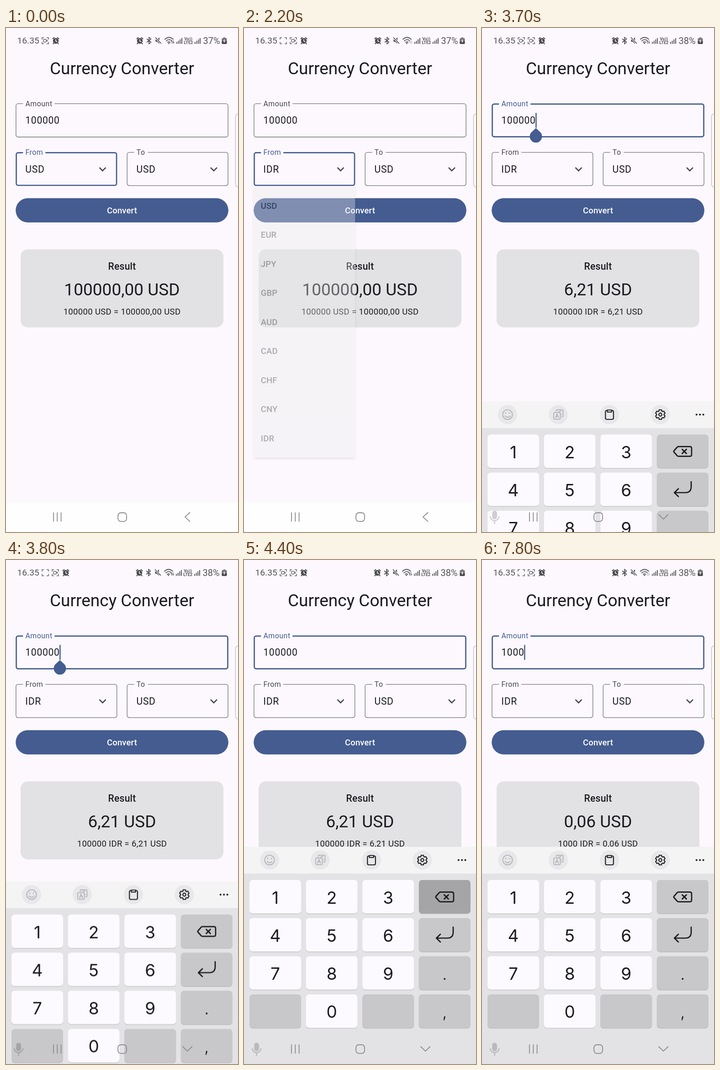
An HTML page that plays this animation: 508 by 1101 pixels, repeating every 8 s.

```html
<!DOCTYPE html>
<html lang="en">
<head>
<meta charset="utf-8">
<title>Currency Converter</title>
<style>
html, body { margin: 0; width: 100%; height: 100%; overflow: hidden; background: #fcf8fd; }
svg { display: block; width: 100%; height: 100%; }
text { font-family: Roboto, sans-serif; fill: #1b1b20; }
.mid { text-anchor: middle; }
.title { font-size: 37.04px; }
.body { font-size: 21.17px; letter-spacing: .66px; }
.label { font-size: 15.88px; letter-spacing: .53px; fill: #45464f; }
.label.on { fill: #445c90; }
.head { font-size: 21.17px; font-weight: 500; letter-spacing: .2px; }
.small { font-size: 18.52px; letter-spacing: .33px; }
.btn { font-size: 18.52px; font-weight: 500; letter-spacing: .13px; }
.digit { font: 37px Inter, sans-serif; text-anchor: middle; }
.line { fill: none; stroke-linecap: round; stroke-linejoin: round; }
.status text { fill: #555558; }
.tiny { font-size: 9.2px; font-weight: 700; text-anchor: middle; }
.blue { fill: #445c90; }

/* 1% = 80 ms; every change is a hard step */
.a { animation: 8s step-end infinite; }
.hid { opacity: 0; }

.scan-new { animation-name: scan-new; }
@keyframes scan-new { 3.75% { opacity: .35 } 5% { opacity: .7 } 6.25% { opacity: 1 } }
.scan-old { animation-name: scan-old; }
@keyframes scan-old {
  3.75% { transform: translateX(9px) } 5% { transform: translateX(18px) } 6.25% { transform: translateX(22px) }
}
.blink { animation: blink 1s step-end infinite; }
@keyframes blink { 0%, 80% { opacity: 0 } 30% { opacity: 1 } }
.arrows { animation-name: arrows; }
@keyframes arrows { 0%, 41.25% { opacity: 1 } 3.75%, 78.75% { opacity: .4 } }
.tray { animation-name: tray; }
@keyframes tray { 31.25% { transform: translateX(-1px) } }
.p37 { animation-name: p37; }
@keyframes p37 { 31.25% { opacity: 0 } }
.p38 { animation-name: p38; }
@keyframes p38 { 31.25% { opacity: 1 } }

.menu { animation-name: menu; transform-origin: 132px 346px; filter: drop-shadow(0 3px 2.5px rgba(0,0,0,.24)); }
@keyframes menu {
  2.5% { opacity: .85; transform: scale(.9) }
  3.75% { opacity: 1; transform: scale(.99) }
  5% { opacity: 1; transform: none }
  27.5% { opacity: .35; transform: none }
  28.75% { opacity: 0 }
}
.usd { animation-name: usd; }
@keyframes usd { 27.5% { opacity: 0 } }
.idr { animation-name: idr; }
@keyframes idr { 27.5% { opacity: 1 } }
.ripple { animation-name: ripple; }
@keyframes ripple { 31.25% { opacity: .12 } 32.5% { opacity: 0 } }

.before { animation-name: before; }
@keyframes before { 45% { opacity: 0 } }
.after { animation-name: after; }
@keyframes after { 45% { opacity: 1 } }

.r1 { animation-name: r1; }
@keyframes r1 { 32.5% { opacity: 0 } }
.r2 { animation-name: r2; }
@keyframes r2 { 32.5% { opacity: 1 } 56.25% { opacity: 0 } }
.n1 { animation-name: n1; }
@keyframes n1 { 56.25% { opacity: 0 } }
.n2 { animation-name: n2; }
@keyframes n2 { 56.25% { opacity: 1 } 85% { opacity: 0 } }
.n3 { animation-name: n3; }
@keyframes n3 { 85% { opacity: 1 } }

.c1 { animation-name: c1; }
@keyframes c1 { 45% { opacity: 1 } 51.25% { opacity: 0 } }
.c2 { animation-name: c2; }
@keyframes c2 { 56.25%, 68.75%, 81.25% { opacity: 1 } 62.5%, 75%, 85% { opacity: 0 } }
.c3 { animation-name: c3; }
@keyframes c3 { 85%, 97.5% { opacity: 1 } 91.25% { opacity: 0 } }
.grip { animation-name: grip; }
@keyframes grip { 45% { opacity: 1 } 55% { opacity: 0 } }

.board { transform: translateY(480px); animation-name: board; }
@keyframes board {
  46.25% { transform: translateY(189px) }
  47.5% { transform: translateY(75.5px) }
  48.75% { transform: translateY(30px) }
  50% { transform: translateY(12px) }
  51.25% { transform: translateY(4px) }
  52.5% { transform: translateY(1px) }
  53.75% { transform: none }
}
.press { animation-name: press; }
@keyframes press { 55% { opacity: 1 } 56.25% { opacity: 0 } }
</style>
</head>
<body>
<svg viewBox="0 0 508 1101">
  <defs>
    <path id="frame" class="line" stroke="#66666a" stroke-width="1.6"
      d="M79 24.5V21h3.5M89.5 21H93v3.5M93 31v3.5h-3.5M82.5 34.5H79V31"/>
    <g id="cam">
      <rect x="82" y="24.7" width="6" height="6" rx="1.2" fill="none" stroke="#66666a" stroke-width="1.4"/>
      <path d="M88 27.7l3-2.6v5.2z" fill="#66666a"/>
    </g>
    <g id="alarm" class="line">
      <circle r="6.3" cy=".6" fill="#4d4d50"/>
      <path d="M-6.6-4l3-2.6M6.6-4l-3-2.6M-4.5 5.6l-1.2 1.4M4.5 5.6l1.2 1.4" stroke="#4d4d50" stroke-width="2"/>
      <path d="M0-2.6V1l2.6 1.6" stroke="#fcf8fd" stroke-width="1.5"/>
    </g>
    <path id="bars" fill="#5c5c60" d="M0 30.5h2v4H0zM3.7 28h2v6.500h-2zM7.400 25h2v9.500h-2zM11 22h2v12.500h-2z"/>
    <path id="chev" fill="#45464f" transform="scale(1.323)" d="M-4.590-3.410L0 1.170l4.590-4.580L6-2 0 4-6-2z"/>
  </defs>

  <rect width="508" height="1101" fill="#fcf8fd"/>
  <rect y="1037" width="508" height="64" fill="#fefefe"/>

  <g class="status">
    <text x="24.5" y="34.300" font-size="19.2">16.35</text>
    <g class="a hid scan-new"><use href="#frame"/><g class="blink"><use href="#cam"/></g></g>
    <g class="a scan-old"><use href="#frame"/><use href="#cam"/><use href="#alarm" x="109" y="27.500"/></g>
    <g class="a tray">
      <use href="#alarm" x="293" y="27.500"/>
      <path class="line" stroke="#505054" stroke-width="1.600" d="M308.500 24l9 7-4.500 3.800V20.200l4.500 3.800-9 7"/>
      <path fill="#505054" d="M327.500 25h3.500l5-4.500v14l-5-4.500h-3.500z"/>
      <path class="line" stroke="#fcf8fd" stroke-width="4" d="M328 21.500l11.500 12"/>
      <path class="line" stroke="#505054" stroke-width="1.700" d="M327.500 21l12 12.500"/>
      <path class="line" stroke="#5c5c60" stroke-width="1.900" d="M348 24.500q9-8 18 0M351 28q6-5 11.500-.5M354 31.300q2.800-2 5.300 0"/>
      <circle cx="356.700" cy="33.500" r="1.500" fill="#5c5c60"/>
      <path class="a arrows line" stroke="#505054" stroke-width="1.200" d="M363.700 33.500v-5.500l-1.300 1.500M366.600 27.500v5.800l1.400-1.500"/>
      <use href="#bars" x="373"/>
      <text class="tiny" x="399.300" y="26.500" font-size="8">Vo))</text>
      <text class="tiny" x="399.300" y="35">LTE2</text>
      <use href="#bars" x="413"/>
    </g>
    <text class="a p37" x="431.500" y="34.500" font-size="20">37%</text>
    <text class="a hid p38" x="430.500" y="34.500" font-size="20">38%</text>
    <path fill="#77777b" d="M476 20.500h4v1.500h1.500q2 0 2 2v9q0 2-2 2h-7q-2 0-2-2v-9q0-2 2-2h1.500z"/>
    <path fill="#4a4a4d" d="M473 28.500h10.500V33q0 2-2 2h-7q-2 0-2-2z"/>
    <path fill="#fcf8fd" d="M479 24l-3.600 5h2.200l-.6 4 3.600-5h-2.200z"/>
  </g>

  <text class="title mid" x="254" y="100.500">Currency Converter</text>

  <g id="fields"></g>
  <text class="body a n1" x="42.300" y="209.200">100000</text>
  <text class="body a hid n2" x="42.300" y="209.200">10000</text>
  <text class="body a hid n3" x="42.300" y="209.200">1000</text>
  <g id="carets" class="blue"></g>
  <path class="a hid grip blue" d="M118 218.500l9.500 9a13.400 13.400 0 1 1-19 0z"/>
  <text class="body a usd" x="42.300" y="315.500">USD</text>
  <text class="body a hid idr" x="42.300" y="315.500">IDR</text>
  <text class="body" x="285.500" y="315.500">USD</text>
  <use href="#chev" x="211.500" y="308.500"/>
  <use href="#chev" x="455" y="308.500"/>

  <rect class="blue" x="21.200" y="371.800" width="465.700" height="53" rx="26.500"/>
  <rect class="a hid ripple" x="21.200" y="371.800" width="465.700" height="53" rx="26.500" fill="#fff"/>
  <text class="btn mid" x="254" y="404.800" style="fill:#fff">Convert</text>

  <rect x="32" y="483.500" width="444" height="170.500" rx="15.900" fill="#e2e1e4"/>
  <text class="head mid" x="254" y="527.500">Result</text>
  <g id="results"></g>

  <rect x="502.600" y="187.600" width="30" height="160" rx="6" fill="#fdfbfe" stroke="#c0bfc4" stroke-width="1.400"/>

  <g class="a hid menu">
    <rect x="21.200" y="346" width="222.200" height="592.800" rx="5.300" fill="#ecebee"/>
    <g id="items"></g>
  </g>

  <g class="a board">
    <rect y="626.500" width="508" height="480" fill="#f4f4f5"/>
    <rect y="685" width="508" height="420" fill="#e3e2e5"/>
    <g fill="#e8e7ea">
      <circle cx="56" cy="655.500" r="21"/><circle cx="167" cy="655.500" r="21"/>
      <circle cx="279" cy="655.500" r="21"/><circle cx="390.500" cy="655.500" r="21"/>
    </g>
    <g class="line" stroke="#b5b4b8" stroke-width="1.900">
      <circle cx="56" cy="655.500" r="10.600"/>
      <path d="M50.500 658.500q5.500 6 11 0"/>
      <path d="M52 652v.5M60 652v.5" stroke-width="2.600"/>
      <rect x="157" y="651" width="14.500" height="14.500" rx="2.500"/>
      <path d="M161 662l3.300-8 3.300 8M162.200 659.500h4.200M162.500 648v-1q0-2 2-2h11q2 0 2 2v11q0 2-2 2h-1"/>
      <path d="M167 648.500h6l-2-1.700M174.500 655h-2" stroke-width="1.500"/>
    </g>
    <g class="line" stroke="#202024" stroke-width="2.200">
      <rect x="270.300" y="646.500" width="17.600" height="19.500" rx="3"/>
      <path d="M274.500 645.500h9.200v4.500h-9.200z" fill="#e8e7ea"/>
      <path id="gear"/>
      <circle cx="390.500" cy="655.500" r="3.300"/>
    </g>
    <g fill="#202024">
      <circle cx="469.800" cy="655.500" r="2.100"/><circle cx="477.200" cy="655.500" r="2.100"/><circle cx="484.600" cy="655.500" r="2.100"/>
    </g>
    <g id="keys"></g>
    <rect class="a hid press" x="383" y="699" width="113" height="73" rx="7" fill="#a5a5a8"/>
    <g class="line" stroke="#1b1b1e" stroke-width="2.700">
      <path d="M430 725.300h25q4 0 4 4v13.400q0 4-4 4h-25q-1.500 0-2.500-1.200l-7-8q-1.400-1.500 0-3l7-8q1-1.200 2.500-1.200z"/>
      <path d="M438.500 731.500l9 9M447.500 731.500l-9 9" stroke-width="3"/>
      <path d="M458 802v11q0 13-13 13h-23.500M430 817.500l-8.800 8.500 8.800 8.500"/>
    </g>
  </g>

  <g class="a hid after" opacity=".2">
    <g opacity=".18">
      <rect x="22.300" y="1054.500" width="10.600" height="18.500" rx="5.300"/>
      <path class="line" stroke="#000" stroke-width="2.400" d="M18 1067.500a9.700 9.700 0 0 0 19.300 0M27.600 1077.500v5"/>
    </g>
  </g>
  <g class="line" stroke="#8b8a8e" stroke-width="1.800">
    <path d="M104 1059v18.500M112.300 1059v18.500M120.600 1059v18.500"/>
    <rect x="245.200" y="1059" width="18.800" height="18.800" rx="6"/>
    <path class="a before" d="M402.500 1058.500l-10.500 9.700 10.500 9.700"/>
    <path class="a hid after" d="M387 1063l10.200 9.800 10.200-9.800"/>
  </g>
</svg>
<script>
const fill = (id, html) => { document.getElementById(id).innerHTML = html; };

// Outlined field with a gap in its top edge for the label
function field(label, x, y, w, gap, on, cls) {
  const s = on ? 2.65 : 1.32, i = s / 2, r = 5.3 - i;
  const l = x + i, t = y + i, h = 74.1 - s, v = w - s;
  const arc = (dx, dy) => `a${r} ${r} 0 0 1 ${dx} ${dy}`;
  const d = `M${x + 16 + gap} ${t}H${l + v - r}${arc(r, r)}v${h - 2 * r}${arc(-r, r)}` +
    `h${2 * r - v}${arc(-r, -r)}v${2 * r - h}${arc(r, -r)}H${x + 16}`;
  return `<g class="${cls}"><path fill="none" d="${d}" stroke="${on ? '#445c90' : '#74757c'}" stroke-width="${s}"/>` +
    `<text class="label${on ? ' on' : ''}" x="${x + 21.2}" y="${y + 6}">${label}</text></g>`;
}

fill('fields',
  field('Amount', 21.2, 164.8, 465.7, 69, false, 'a before') +
  field('Amount', 21.2, 164.8, 465.7, 69, true, 'a hid after') +
  field('From', 21.2, 271, 222.2, 49, true, 'a before') +
  field('From', 21.2, 271, 222.2, 49, false, 'a hid after') +
  field('To', 264.6, 271, 222.2, 30, false, ''));

fill('carets', [6, 5, 4].map((n, i) =>
  `<rect class="a hid c${i + 1}" x="${42 + 12.52 * n}" y="185.5" width="2.5" height="32.5"/>`).join(''));

fill('results', [
  ['a r1', '100000 USD', '100000,00'],
  ['a hid r2', '100000 IDR', '6,21'],
  ['a hid n2', '10000 IDR', '0,62'],
  ['a hid n3', '1000 IDR', '0,06']
].map(([cls, from, sum]) =>
  `<g class="${cls}"><text class="title mid" x="254" y="584">${sum} USD</text>` +
  `<text class="small mid" x="254" y="626">${from} = ${sum} USD</text></g>`).join(''));

fill('items', 'USD EUR JPY GBP AUD CAD CHF CNY IDR'.split(' ').map((c, i) =>
  `<text class="btn" x="36.800" y="${394.7 + 63.5 * i}">${c}</text>`).join(''));

fill('keys', ['123 ', '456 ', '789.', ' 0 ,'].map((row, j) => [...row].map((c, i) => {
  const x = 12 + 123.6 * i, y = 699 + 83.3 * j, num = c >= '0' && c <= '9';
  const box = (dy, col) => `<rect x="${x}" y="${y + dy}" width="113" height="73" rx="7" fill="${col}"/>`;
  return box(1.6, num ? '#c9c8cc' : '#bdbcc0') + box(0, num ? '#fcfafe' : '#c8c7ca') +
    `<text class="digit" x="${x + 56.5}" y="${y + 51.5}"${num ? '' : ' style="font-size:30px"'}>${c}</text>`;
}).join('')).join(''));

const teeth = [];
for (let k = 0; k < 6; k++) {
  for (const [off, r] of [[-14, 10.8], [14, 10.8], [22, 8.3], [38, 8.3]]) {
    const a = (k * 60 - 90 + off) * Math.PI / 180;
    teeth.push((390.5 + r * Math.cos(a)).toFixed(1) + ' ' + (655.5 + r * Math.sin(a)).toFixed(1));
  }
}
document.getElementById('gear').setAttribute('d', 'M' + teeth.join('L') + 'z');
</script>
</body>
</html>
```
